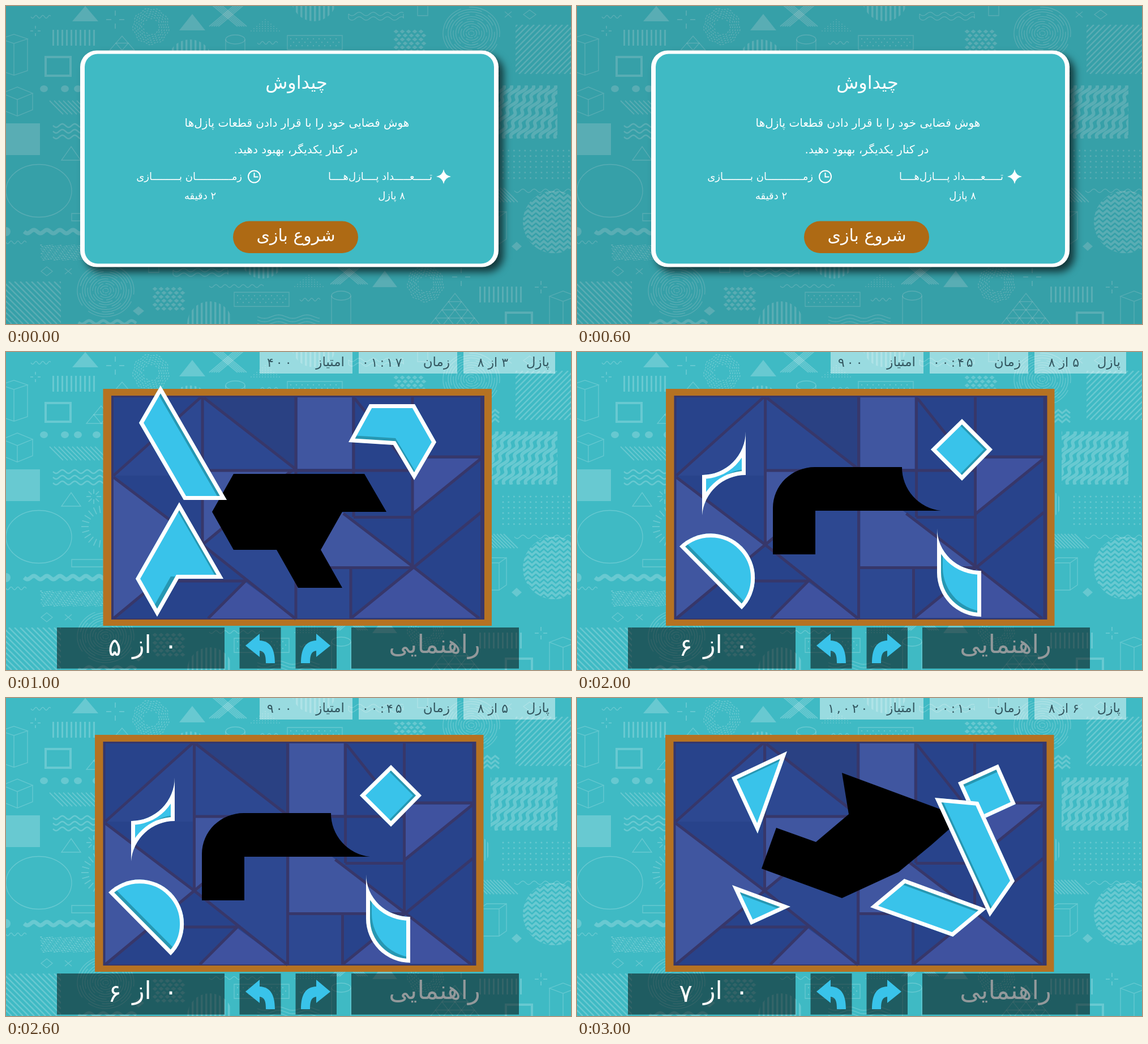
Write an HTML page with a canvas that moves like this. It is 998 px wide and 561 px high and loops after 4 s.

```html
<!DOCTYPE html>
<html lang="fa">
<head>
<meta charset="utf-8">
<title>پازل</title>
<style>
html, body { margin: 0; width: 100%; height: 100%; overflow: hidden; background: #3fbac4; }
canvas { display: block; }
</style>
</head>
<body>
<canvas id="stage" width="998" height="561"></canvas>
<script>
const W = 998, H = 561, TAU = Math.PI * 2;
const TEAL = '#3fbac4', CYAN = '#39c3ea', DARK = '#37376a';
const stage = document.getElementById('stage');
const main = stage.getContext('2d');
let c = main;

// ---- drawing helpers ----
function fill(d, color) { c.fillStyle = color; c.fill(new Path2D(d)); }
function line(d, w = 1.3) { c.lineWidth = w; c.stroke(new Path2D(d)); }
function box(x, y, w, h, color) { c.fillStyle = color; c.fillRect(x, y, w, h); }
function disc(x, y, r) { c.beginPath(); c.arc(x, y, r, 0, TAU); c.fill(); }
function ring(x, y, rx, ry = rx, w = 1.3) {
  c.lineWidth = w;
  c.beginPath(); c.ellipse(x, y, rx, ry, 0, 0, TAU); c.stroke();
}
function clipped(d, draw) { c.save(); c.clip(new Path2D(d)); draw(); c.restore(); }
function text(s, x, y, size, color = '#fff', align = 'center', gap = 0) {
  c.font = size + 'px "DejaVu Sans", sans-serif';
  c.direction = align === 'left' ? 'ltr' : 'rtl';
  c.textAlign = align;
  c.letterSpacing = gap + 'px';
  c.fillStyle = color;
  c.fillText(s, x, y);
  c.letterSpacing = '0px';
}
const rectPath = (x, y, w, h) => `M${x} ${y}h${w}v${h}h${-w}Z`;
const circlePath = (x, y, r) => `M${x - r} ${y}a${r} ${r} 0 1 1 ${2 * r} 0a${r} ${r} 0 1 1 ${-2 * r} 0Z`;

// ---- background ornaments ----
function wave(x, y, len, amp = 2.5, step = 12, w = 1.3) {
  c.lineWidth = w;
  c.beginPath();
  for (let i = 0; i <= len; i++) c.lineTo(x + i, y + amp * Math.sin(i / step * TAU));
  c.stroke();
}
function bars(x, y, w, h, step = 8, lw = 3) {
  for (let i = 0; i < w; i += step) c.fillRect(x + i, y, lw, h);
}
function hatch(x, y, w, h, dir = 1, step = 10, lw = 2.5) {
  clipped(rectPath(x, y, w, h), () => {
    for (let i = -h; i < w + h; i += step) line(`M${x + i} ${y}l${dir * h} ${h}`, lw);
  });
}
function slants(x, y, w, h, step = 8) {
  for (let i = 0; i < w - h; i += step) line(`M${x + i} ${y}l${h} ${h}`, 1.8);
}
function dots(x, y, w, h, step, r) {
  for (let j = 0; j <= h; j += step)
    for (let i = 0; i <= w; i += step) disc(x + i, y + j, r);
}
function triangle(x, y, half, h, solid = true) {
  const d = `M${x} ${y}l${half} ${h}h${-2 * half}Z`;
  solid ? c.fill(new Path2D(d)) : line(d);
}
function diamond(x, y, rx, ry, solid = true) {
  const d = `M${x - rx} ${y}l${rx} ${-ry}l${rx} ${ry}l${-rx} ${ry}Z`;
  solid ? c.fill(new Path2D(d)) : line(d);
}
function triGrid(x, y, half, h, rows) {
  const dx = half / rows, dy = h / rows;
  for (let r = 0; r < rows; r++)
    for (let k = 0; k <= r; k++) triangle(x + (2 * k - r) * dx, y + r * dy, dx, dy, false);
}
function dotTriangle(x, y) {
  for (let r = 0; r < 6; r++)
    for (let k = -r; k <= r; k++) disc(x + k * 5, y + r * 4, 0.9);
}
function checker(x, y) {
  for (let r = 0; r < 6; r++)
    for (let k = 0; k < 5; k++) diamond(x + 6 + k * 11 + r % 2 * 5, y + 4 + r * 7, 4.5, 3.5);
}
function fingerprint(x, y) {
  for (let k = 0; k < 11; k++)
    for (let s = 0; s < 3; s++) {
      const a = s * 2.1 + k * 1.3;
      c.lineWidth = 1.3;
      c.beginPath();
      c.ellipse(x, y, 5 + k * 4.5, 4 + k * 4.2, 0, a, a + 1.8);
      c.stroke();
    }
}
function donut(x, y) {
  for (let r = 15; r < 33; r += 4)
    for (let a = 0; a < TAU; a += 5 / r) {
      c.lineWidth = 1.6;
      c.beginPath(); c.arc(x, y, r + 1.5 * Math.sin(a * 9), a, a + 3 / r); c.stroke();
    }
}
function bigCross(x, y) {
  for (const s of [-1, 1])
    for (let k = -2; k <= 2; k++) line(`M${x - s * 25 + k * 4} ${y - 21}l${s * 50} 42`, 2);
}
function rays(x, y, r0, r1, n) {
  for (let k = 0; k < n; k++) {
    const a = k / n * TAU, u = Math.cos(a), v = Math.sin(a);
    line(`M${x + r0 * u} ${y + r0 * v}L${x + r1 * u} ${y + r1 * v}`, 1.8);
  }
}
function ribbon(x, y) {
  wave(x, y - 4, 97, 3, 25);
  wave(x, y + 4, 97, 3, 25);
  line(`M${x} ${y - 4}v8M${x + 97} ${y - 4}v8`);
}
function dotBox(x, y) {
  line(rectPath(x, y, 97, 25));
  for (let r = 0; r < 3; r++)
    for (let k = 0; k < 9; k++) disc(x + 6 + k * 10 + r % 2 * 5, y + 6 + r * 6, 1.2);
}
function cylinder(x, y, h) {
  ring(x, y, 17, 8);
  line(`M${x - 17} ${y}v${h}M${x + 17} ${y}v${h}M${x - 17} ${y + h}a17 8 0 0 0 34 0`);
}
function cuboid(x, y, w, d, h) {
  line(`M${x - w} ${y}l${w} ${-d}l${w} ${d}l${-w} ${d}ZM${x - w} ${y}v${h}l${w} ${d}l${w} ${-d}v${-h}M${x} ${y + d}v${h}`);
}
function smallX(x, y) { line(`M${x - 6} ${y - 5}l12 10m0 -10l-12 10`); }
function dome(x, y, r, up) {
  clipped(circlePath(x, y, r), () => bars(x - r, up ? y - r : y, 2 * r, r, 8, 3.5));
}

function ornaments() {
  c.fillStyle = c.strokeStyle = 'rgba(255,255,255,.21)';
  // top
  wave(44, 19, 35); triangle(140, 0, 23, 27); rays(193, 24, 7, 16, 4); rays(52, 44, 4, 9, 4);
  donut(256, 36); triangle(329, 14, 23, 29); bigCross(392, 15); bars(82, 42, 80, 28);
  triGrid(205, 53, 22, 25, 2); triGrid(168, 95, 26, 31, 2); dome(325, 99, 40, true);
  cylinder(405, 59, 50); dotTriangle(458, 24); wave(444, 65, 36); dotBox(497, 52);
  dome(544, -13, 40, false); ribbon(605, 18); line(rectPath(727, -4, 18, 21));
  checker(683, 41); fingerprint(822, 48); smallX(887, 15); diamond(925, 15, 11, 8, false);
  hatch(900, 33, 98, 87, -1);
  // left
  cuboid(14, 58, 24, 8, 56); cuboid(20, 154, 27, 11, 29);
  line(rectPath(70, 90, 44, 33), 4);
  for (const x of [67, 104, 127, 160]) { c.beginPath(); c.ellipse(x, 146, 7, 6, 0, 0, TAU); c.fill(); }
  slants(77, 167, 110, 24);
  for (let k = 0; k < 3; k++) wave(83, 211 + k * 10, 89, 3, 22, 2.5);
  c.fillRect(0, 207, 60, 56);
  triangle(115, 248, 17, 24, false); rays(155, 255, 5, 13, 8);
  ring(58, 326, 58, 46.5); rays(170, 308, 24, 37, 22);
  line(rectPath(116, 366, 56, 13)); disc(0, 398, 8); wave(32, 398, 141, 3, 23, 7); wave(0, 417, 36);
  for (let k = 0; k < 330; k++) c.fillRect(60 + k * 41.7 % 112, 421 + k * 17.3 % 27, 3, 1.2);
  diamond(72, 468, 10, 8, false); smallX(110, 468);
  // right
  for (let k = 0; k < 3; k++) line(`M843 ${108 + k * 8}l7 -6l7 6l7 -6l7 6`, 3);
  clipped(rectPath(856, 140, 118, 94), () => {
    for (let k = 0; k < 17; k++) {
      c.lineWidth = 6;
      c.beginPath();
      for (let y = 140; y <= 234; y += 2)
        c.lineTo(840 + k * 13 - (y - 140) * 0.7 + 4 * Math.sin(y / 3.7), y);
      c.stroke();
    }
  });
  dots(878, 255, 120, 50, 9.7, 1.5);
  clipped(circlePath(830, 268, 25), () => bars(805, 243, 50, 50, 5, 2));
  slants(825, 321, 85, 25, 6); wave(898, 326, 100, 3, 20);
  clipped(circlePath(968, 381, 55), () => {
    for (let y = 325; y < 440; y += 9) {
      c.lineWidth = 4;
      c.beginPath();
      for (let k = 0; k < 18; k++) c.lineTo(908 + k * 7, y + k % 2 * 6);
      c.stroke();
    }
  });
  line('M836 372h35v48h-35ZM871 372l13 -9v48l-13 9M836 372l13 -9h35');
  diamond(902, 424, 9, 8);
  // bottom
  hatch(0, 486, 97, 75); fingerprint(176, 502); diamond(234, 538, 10, 8); checker(257, 495);
  line(rectPath(252, 452, 18, 18)); ribbon(295, 470); dome(453, 441, 40, false);
  wave(359, 494, 96, 2.5, 16); wave(128, 558, 102, 3, 25, 5); dotBox(403, 505);
  for (let k = 0; k < 3; k++) wave(444, 548 + k * 6, 110, 3, 50);
  dotTriangle(535, 475); wave(519, 518, 36); bigCross(606, 470); cylinder(592, 511, 50);
  triangle(669, 467, 22, 29); donut(741, 490); rays(804, 478, 7, 16, 4); bars(836, 495, 80, 28);
  triGrid(793, 507, 46, 58, 4); line(rectPath(883, 541, 46, 33), 4); rays(945, 496, 4, 11, 4);
  cuboid(984, 512, 24, 9, 56); dome(360, 561, 40, true);
}

const backdrop = document.createElement('canvas');
backdrop.width = W; backdrop.height = H;
c = backdrop.getContext('2d');
box(0, 0, W, H, TEAL);
ornaments();
c = main;

// ---- start screen ----
const PUZZLES = 'پازل\u200cها';
const kashida = n => '\u0640'.repeat(n);
function intro() {
  box(0, 0, W, H, 'rgba(0,0,0,.14)');
  c.save();
  c.shadowColor = 'rgba(0,0,0,.65)';
  c.shadowBlur = 14;
  c.shadowOffsetX = c.shadowOffsetY = 9;
  c.fillStyle = '#fff';
  c.beginPath(); c.roundRect(131, 78.5, 739, 382, 29); c.fill();
  c.restore();
  c.fillStyle = TEAL;
  c.beginPath(); c.roundRect(139, 84.5, 723, 370, 23); c.fill();

  text('چیداوش', 513, 146, 32);
  text('هوش فضایی خود را با قرار دادن قطعات ' + PUZZLES, 514, 213, 20);
  text('در کنار یکدیگر، بهبود دهید.', 512, 260, 20);
  const count = 'ت' + kashida(5) + 'ع' + kashida(5) + 'داد ';
  const spread = PUZZLES.replace('پ', 'پ' + kashida(4)).replace('ه', 'ه' + kashida(4));
  text(count + spread, 753, 307, 18, '#fff', 'right');
  text('زم' + kashida(12) + 'ان ب' + kashida(9) + 'ازی', 417, 307, 18, '#fff', 'right');
  text('۸ پازل', 681, 341, 18);
  text('۲ دقیقه', 343, 341, 18);

  fill('M773 288Q775 299 786 301Q775 303 773 314Q771 303 760 301Q771 299 773 288Z', '#fff');
  c.strokeStyle = '#fff';
  ring(438.5, 301, 10.5, 10.5, 2);
  line('M438.5 294v7.5h7', 2);

  c.fillStyle = '#ae6a14';
  c.beginPath(); c.roundRect(401, 379.5, 221, 56.5, 28.2); c.fill();
  text('شروع بازی', 512, 415, 30);
}

// ---- game board ----
const SEAMS = [
  'M190 218L345 79M347 78V340M190 221L347 340L512 471M190 470L347 340L506 208',
  'M350 81L512 207M512 78V471M347 209H719M614 78V291M609 380V471M718 78V378',
  'M616 82L718 210M718 185H840M839 188L718 286M614 291.5H718M596 285L718 378',
  'M839 283L609 470M718 378L836 470M512 380.5H718M270 404H423L357 470'
].join('');
function board(dx) {
  c.save();
  c.translate(dx, 0);
  box(171.5, 65, 686.5, 418, '#b57222');
  box(186, 77, 659, 395, DARK);
  box(190, 80, 648, 390, '#28438b');
  fill('M347 80V218L190 218ZM350 84V208H512ZM347 340L512 471V208ZM512 380H609V470H512Z', '#2d4891');
  fill('M350 80H512V207Z', '#2a4183');
  fill('M190 221L347 340L190 468ZM515 80H611V206H515ZM349 211H502L349 338ZM515 222L718 378H515Z', '#4056a0');
  fill('M838 188H720V283ZM423 406L359 470H510ZM718 380L609 469H834Z', '#3f529f');
  c.strokeStyle = DARK;
  line(SEAMS, 5);
  c.restore();
}

function piece([d, dx, dy]) {
  const path = new Path2D(d);
  c.save();
  c.clip(path);
  c.fillStyle = '#2697b2';
  c.fill(path);
  c.translate(dx, dy);
  c.fillStyle = CYAN;
  c.fill(path);
  c.translate(-dx, -dy);
  c.strokeStyle = '#fff';
  c.lineWidth = 14;
  c.stroke(path);
  c.restore();
}

function hud(level) {
  const ink = 'rgba(25,52,62,.8)', pane = 'rgba(255,255,255,.47)', shade = 'rgba(0,0,0,.5)';
  const left = level.wide ? 429 : 448;
  box(left, 0, 612 - left, 38, pane);
  box(623, 0, 174, 38, pane);
  box(808, 0, 162, 38, pane);
  text('پازل', 960, 25, 23, ink, 'right');
  text(level.round + ' از ۸', 887, 26, 22, ink, 'right');
  text('زمان', 784, 25, 23, ink, 'right');
  text(level.time, 629, 26, 22, ink, 'left', 4);
  text('امتیاز', 598, 25, 23, ink, 'right');
  text(level.score, level.wide ? 443 : 461, 26, 22, ink, 'left', 4);

  box(90, 486, 296, 72.5, shade);
  box(412.5, 486, 73, 72.5, shade);
  box(511.5, 486, 72.5, 72.5, shade);
  box(610, 486, 296, 72.5, shade);
  text('۰', 291, 533, 44);
  text('از', 240, 531, 44);
  text(level.total, 192, 536, 44);
  text('راهنمایی', 757, 531, 45, '#93999b');

  const arrow = 'M423 518L448 497V509C467 510 475 523 475 549H459C459 535 457 528 448 527V538Z';
  fill(arrow, CYAN);
  c.save();
  c.translate(996, 0);
  c.scale(-1, 1);
  fill(arrow, CYAN);
  c.restore();
}

// Each piece: outline, then the offset of its lit face.
const LEVELS = [
  {
    dx: 0, round: '۳', time: '۰۱:۱۷', score: '۴۰۰', total: '۵',
    hole: 'M402 215H633L672 282H594L556 349L594 416H516L478 349H402L364 282Z',
    pieces: [
      ['M273 59L390 261H314L235 125Z', -13, 0],
      ['M605 159L642 92H722L760 159L721 226L684 164Z', 4, -12],
      ['M306 265L384 400H305L267 467L229 400Z', -14, -4]
    ]
  },
  {
    dx: -14.5, round: '۵', time: '۰۰:۴۵', score: '۹۰۰', total: '۶',
    hole: 'M346 357V275A74 72 0 0 1 420 203H574A77 77 0 0 0 643 280H421V357Z',
    pieces: [
      ['M680 118L734 172L680 227L625 172Z', -15, 0],
      ['M298 140V217A77 77 0 0 0 221 288V217A77 77 0 0 0 298 140Z', 4, -10],
      ['M181 343A78 78 0 0 1 291 454Z', 9, -9],
      ['M636 311A77 75 0 0 0 714 386V467A78 78 0 0 1 636 389Z', 10, -9]
    ]
  },
  {
    dx: -15.5, round: '۶', time: '۰۰:۱۰', score: '۱,۰۲۰', total: '۷', wide: true,
    hole: 'M468 132L660 203L658 231L625 260L568 307L468 353L326 301L352 229L422 254L480 205Z',
    pieces: [
      ['M273 140L371 94L319 239Z', -4, 13],
      ['M673 149L744 117L775 187L705 219Z', 4, 11],
      ['M632 176L709 183L773 323L729 386Z', 12, 1],
      ['M578 319L723 372L664 421L518 369Z', -4, 10],
      ['M274 330L377 368L307 400Z', -4, 10]
    ]
  }
];

function play(level) {
  board(level.dx);
  hud(level);
  fill(level.hole, '#000');
  level.pieces.forEach(piece);
}

const start = performance.now();
function frame() {
  const step = Math.floor((performance.now() - start) % 4000 / 1000);
  c.drawImage(backdrop, 0, 0);
  step ? play(LEVELS[step - 1]) : intro();
  requestAnimationFrame(frame);
}
frame();
</script>
</body>
</html>
```
